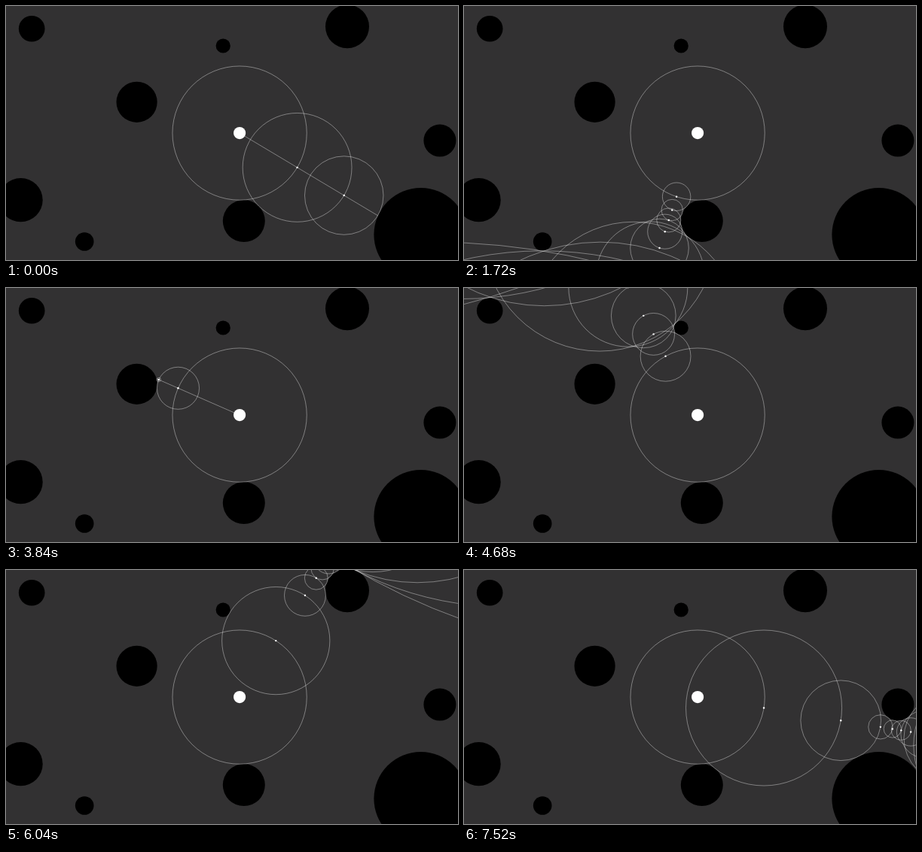
Animation of 600 by 338 pixels, one loop 7.56 s. Source, as an HTML page with a canvas:

```html
<!DOCTYPE html>
<html lang="en">
<head>
<meta charset="utf-8">
<title>Sphere tracing</title>
<style>
html, body { margin: 0; width: 100%; height: 100%; overflow: hidden; background: #323132; }
canvas { display: block; }
</style>
</head>
<body>
<canvas id="stage" width="600" height="338"></canvas>
<script>
const ctx = document.getElementById('stage').getContext('2d');
const W = 600, H = 338, LOOP = 7560, STEP = 40;
const EYE = { x: 310.1, y: 169.1 };
const HIT = 1, FAR = 1500;
const START_DEG = 30.9, DEG_PER_MS = 0.045;

// Obstacles: x, y, radius
const balls = [
  [34.2, 30.2, 17.3], [288.2, 53, 9.6], [453, 27.3, 29],
  [173.6, 127.8, 27.1], [575.9, 179.1, 21.5], [19.6, 258.2, 29.1],
  [104.2, 313.5, 12.3], [315.8, 286.1, 28], [550.6, 304.2, 62.2]
];

function gap(x, y) {
  return Math.min(...balls.map(([bx, by, r]) => Math.hypot(x - bx, y - by) - r));
}

function disc(x, y, r, color) {
  ctx.fillStyle = color;
  ctx.beginPath();
  ctx.arc(x, y, r, 0, Math.PI * 2);
  ctx.fill();
}

function ring(x, y, r) {
  ctx.beginPath();
  ctx.arc(x, y, r, 0, Math.PI * 2);
  ctx.stroke();
}

// Step along the ray by the distance to the nearest obstacle
function march(angle) {
  const dx = Math.cos(angle), dy = Math.sin(angle);
  const points = [];
  let dist = 0, hit = false;
  while (dist < FAR) {
    const x = EYE.x + dx * dist, y = EYE.y + dy * dist;
    const r = gap(x, y);
    if (r < HIT) { hit = true; break; }
    points.push({ x, y, r });
    dist += r;
  }
  return { points, hit, x: EYE.x + dx * dist, y: EYE.y + dy * dist };
}

function draw(t) {
  ctx.fillStyle = '#323132';
  ctx.fillRect(0, 0, W, H);
  for (const [x, y, r] of balls) disc(x, y, r, '#000');

  const ray = march((START_DEG + DEG_PER_MS * t) * Math.PI / 180);
  ctx.strokeStyle = 'rgba(255,255,255,0.55)';
  ctx.lineWidth = 0.7;
  for (const p of ray.points) ring(p.x, p.y, p.r);
  if (ray.hit) {
    ctx.beginPath();
    ctx.moveTo(EYE.x, EYE.y);
    ctx.lineTo(ray.x, ray.y);
    ctx.stroke();
  }
  for (const p of ray.points) disc(p.x, p.y, 1.2, '#fff');
  disc(EYE.x, EYE.y, 8.1, '#fff');
}

const start = performance.now();
function tick() {
  const t = (performance.now() - start) % LOOP;
  draw(Math.floor(t / STEP) * STEP);
  requestAnimationFrame(tick);
}
tick();
</script>
</body>
</html>
```
